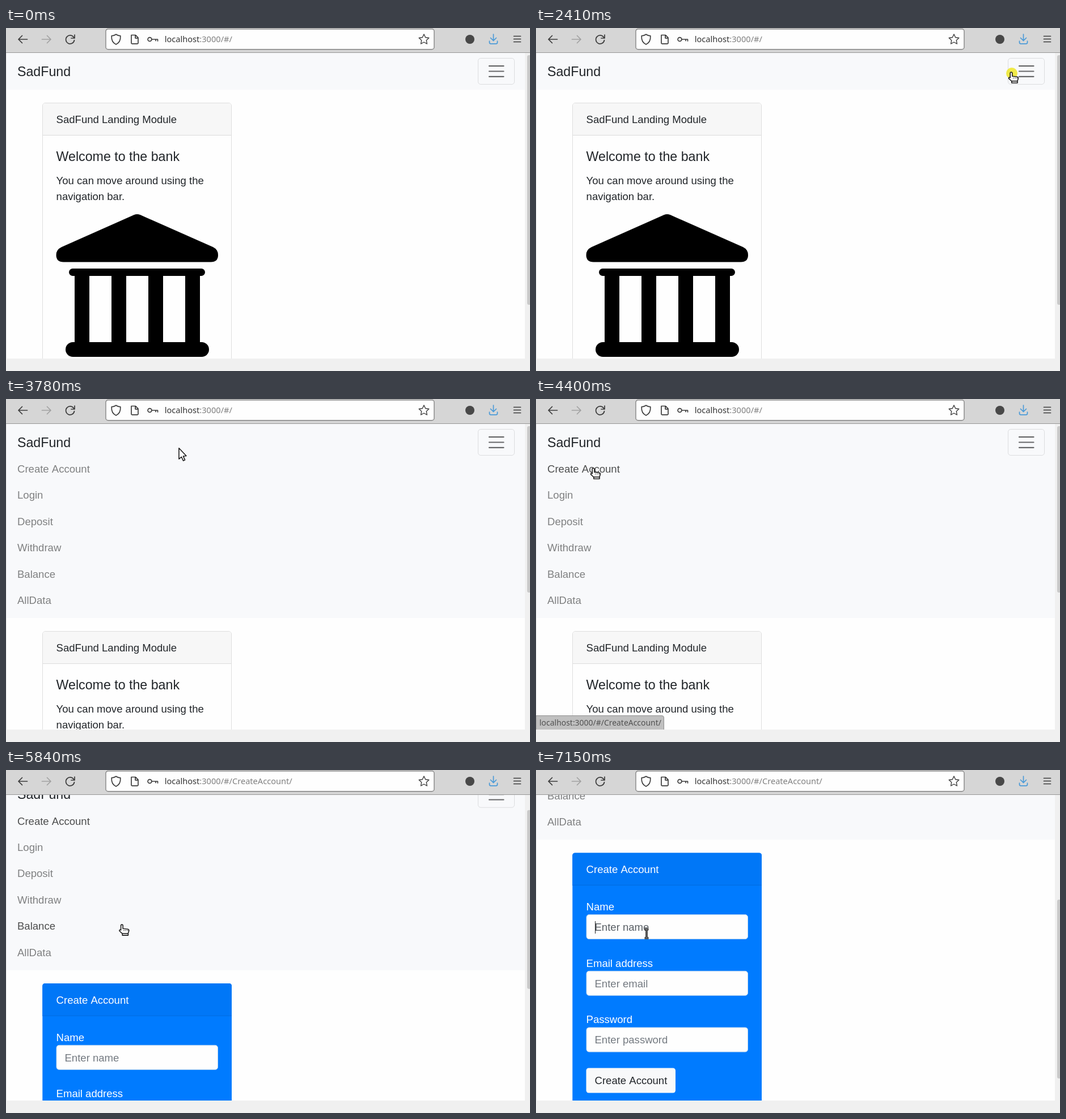
An HTML page for the animation above (8000 ms loop, 924 by 606 pixels).

```html
<!DOCTYPE html>
<html lang="en">
<head>
<meta charset="utf-8">
<title>Bank demo</title>
<style>
html, body { margin: 0; width: 924px; height: 606px; overflow: hidden; background: #fefefe; }
svg { display: block; }
text { font: 18.56px "Liberation Sans", Arial, sans-serif; fill: #212529; white-space: pre; }
.big { font-size: 23.2px; }
.account { word-spacing: 1px; }
.link { fill: #7f8081; }
.link.on { fill: #4c4d4d; }
.white { fill: #fff; }
.hint { fill: #747a81; }
.hint.on { fill: #585e64; }
.url { font: 14.6px "Noto Sans", "Open Sans", sans-serif; fill: #7f7f7f; }
.url .host { fill: #333; }
.tip { font-size: 13.95px; fill: #505050; }
.icon { fill: none; stroke: #3c3c3c; stroke-width: 1.7; stroke-linecap: round; stroke-linejoin: round; }
.cursor { fill: #fff; stroke: #1c1c1c; stroke-width: 1.6; stroke-linejoin: round; }
</style>
</head>
<body>
<svg id="stage" width="924" height="606" viewBox="0 0 924 606">
  <rect width="924" height="606" fill="#fefefe"/>

  <g id="page">
    <rect id="navbar" width="916" height="109" fill="#f8f9fb"/>
    <text class="big" x="20" y="84.6">SadFund</text>
    <rect x="832.5" y="53.5" width="64" height="46" rx="4.6" fill="none" stroke="#dcdddf"/>
    <path d="M852 67.2h25.5M852 76.5h25.5M852 85.8h25.5" stroke="#666768" stroke-width="2.2" stroke-linecap="round"/>
    <svg id="menu" y="99.7" width="916" height="0"></svg>

    <g id="content">
      <g id="landing">
        <rect x="64.5" y="132.5" width="333" height="520" rx="4.6" fill="#fefefe" stroke="#dedede"/>
        <path d="M65 189V137q0-4 4-4h324q4 0 4 4v52z" fill="#f7f7f7"/>
        <path d="M65 189.5h332" stroke="#dcdcdc"/>
        <text x="88.6" y="168">SadFund Landing Module</text>
        <text class="big" x="88.6" y="235.4">Welcome to the bank</text>
        <text x="88.6" y="276">You can move around using the</text>
        <text x="88.6" y="303.8">navigation bar.</text>
        <path d="M225.5 330.2Q231 328 237 330.2L365 387Q374 391.5 374 401Q374 413.5 361 413.5H101.5Q88.5 413.5 88.5 401Q88.5 391.5 98 387Z"/>
        <rect x="111" y="425" width="240" height="13" rx="6.5"/>
        <path d="M134 436v121m65 0v-121m65 0v121m65 0v-121" stroke="#000" stroke-width="26" fill="none"/>
        <rect x="105" y="555" width="253" height="26" rx="13"/>
      </g>
      <g id="form">
        <rect x="64.3" y="132.4" width="333.7" height="480" rx="4.6" fill="#007bff"/>
        <path d="M64.3 189.5V137q0-4.6 4.6-4.6h324.5q4.6 0 4.6 4.6v52.5z" fill="#0077f7"/>
        <path d="M64.3 189.5h333.7" stroke="#006cdf"/>
        <text class="white account" x="88.6" y="168">Create Account</text>
        <g id="fields"></g>
        <rect x="88.5" y="512.5" width="157.5" height="44" rx="4.6" fill="#f8f9fa"/>
        <text class="account" x="103.5" y="541">Create Account</text>
        <path id="caret" d="M104.5 253v22" stroke="#222"/>
      </g>
    </g>
  </g>

  <path d="M.5 44v540" stroke="#e4e4e4"/>
  <rect x="915" y="44" width="9" height="540" fill="#f0f0f0"/>
  <rect id="thumb" x="919" width="8" rx="3" fill="#cacaca"/>

  <g id="status">
    <path d="M0 584V559.5H222q3.5 0 3.5 3.5V584" fill="#c0c0c0" stroke="#8e8e8e"/>
    <text class="url tip" x="6" y="577">localhost:3000/#/CreateAccount/</text>
  </g>

  <rect y="584" width="924" height="22" fill="#f0f0f0"/>
  <rect width="924" height="43" fill="#d6d6d6"/>
  <path d="M0 43.5h924" stroke="#979797"/>
  <rect x="176" y="1.8" width="579" height="36" rx="4" fill="#fefefe" stroke="#858585" stroke-width="1.4"/>
  <text class="url" x="279.7" y="25"><tspan class="host">localhost</tspan>:3000/#/<tspan id="route"></tspan></text>
  <g class="icon">
    <path d="M37.5 20H22M28.5 13.5L22 20l6.5 6.5"/>
    <path d="M63.5 20H79M72.5 13.5L79 20l-6.5 6.5" stroke="#a2a2a2"/>
    <path d="M119.5 16.5A7.5 7.5 0 1 0 120.5 21.5M121 12v6h-6"/>
    <path d="M194 11.2C196.5 13 199 13.7 201.8 13.8C202.3 21 199.5 26.5 194 29C188.5 26.5 185.7 21 186.2 13.8C189 13.7 191.5 13 194 11.2Z"/>
    <path d="M221 12.5h7.5l4.5 4.7v9.3q0 1.3-1.3 1.3h-9.4q-1.3 0-1.3-1.3zM228 12.8v5h4.8"/>
    <path d="M257 20h10.5v3M264 20v2.5"/>
    <circle cx="253.5" cy="20" r="3.4"/>
    <path d="M737 11l2.7 5.7 6.1.8-4.5 4.3 1.1 6.2-5.4-3-5.4 3 1.1-6.2-4.5-4.3 6.1-.8z" stroke-width="1.4"/>
    <circle cx="818" cy="20" r="8" fill="#484848" stroke="none"/>
    <path d="M859.5 11v11.5m-5-5l5 5 5-5M852.5 23v2.5q0 2.3 2.3 2.3h9.4q2.3 0 2.3-2.3v-2.5" stroke="#4a9ad8"/>
    <path d="M895.5 14.5h12M895.5 19.5h12M895.5 24.5h12"/>
  </g>

  <g id="pointer">
    <circle id="glow" cx="1" cy="1" r="10" fill="#efe728" opacity=".85"/>
    <path id="arrow" class="cursor" d="M0-.3V19L4.4 15.2L7.7 22L10.6 20.6L7.6 14L13 13.5Z"/>
    <g id="hand" class="cursor">
      <path d="M-1.8 1Q-1.8-1 0-1T1.8 1V6.2L10.5 7.2Q12.6 7.8 12.4 10L11 14.5V18H.8V15L-4.2 10.4Q-5 8.2-3 8.2L-1.8 8.8Z"/>
      <path d="M3 9.5h8" stroke-width="1.2" stroke-dasharray="1.5 1.7"/>
      <path d="M.8 14.8h10.2"/>
    </g>
    <g id="beam" fill="none">
      <path d="M-3.5-7.5h7M0-7.5V8M-3.5 8h7" stroke="#1c1c1c" stroke-width="3.6"/>
      <path d="M-3.5-7.5h7M0-7.5V8M-3.5 8h7" stroke="#aaa" stroke-width=".9"/>
    </g>
  </g>
</svg>

<script>
const LOOP = 8000, STEP = 70, MENU = 278, ROW = 46.4, TOP = 99.7, SCROLL = 264;
const ARRIVE = 1050, LOADED = 4930, FOCUS = 6890;
const clicks = [[2410, 2610], [4800, LOADED], [6820, 7010]];

// the picture is refreshed every STEP ms, counted from the start of each action
const actions = [0, 450, ARRIVE, 2410, 2540, 3290, 4130, 4800, LOADED, 5420, 6260, 7080];

// pointer glides; power above 1 slows down on that axis, below 1 speeds up
const home = { x: 924, y: 606 };
const glides = [
  { from: 380, to: 520, x: 905, y: 595, px: 1, py: 1 },
  { from: ARRIVE, to: 1750, x: 838, y: 79, px: 1.5, py: 1.5 },
  { from: 3290, to: 4060, x: 101, y: 123, px: 1.27, py: .2 },
  { from: 5420, to: 6120, x: 213, y: 288, px: 2.8, py: 2.7 },
  { from: 6260, to: 7010, x: 219, y: 289, px: 1, py: 1 },
  { from: 7010, to: 7150, x: 195, y: 289, px: 1, py: 1 }
];

const $ = id => document.getElementById(id);
const show = (id, on) => $(id).setAttribute("visibility", on ? "visible" : "hidden");
const set = (id, attrs) => Object.entries(attrs).forEach(([k, v]) => $(id).setAttribute(k, v));
const part = (t, from, to) => Math.min(1, Math.max(0, (t - from) / (to - from)));
const smooth = p => p * p * (3 - 2 * p);
const glide = (p, power) => 1 - (1 - p) ** power;
const within = (v, low, high) => v > low && v < high;

function snap(t) {
  const start = actions.filter(a => a <= t).pop();
  return start + Math.floor((t - start) / STEP) * STEP;
}

function pointerAt(t) {
  return glides.reduce((at, g) => {
    const p = part(t, g.from, g.to);
    return {
      x: at.x + (g.x - at.x) * glide(p, g.px),
      y: at.y + (g.y - at.y) * glide(p, g.py)
    };
  }, home);
}

["Create Account", "Login", "Deposit", "Withdraw", "Balance", "AllData"].forEach((label, i) => {
  $("menu").innerHTML += `<text class="link account" x="20" y="${30.3 + i * ROW}">${label}</text>`;
});
[["Name", "name"], ["Email address", "email"], ["Password", "password"]].forEach(([label, hint], i) => {
  const y = i * 99.7;
  $("fields").innerHTML += `<text class="white" x="88.6" y="${234 + y}">${label}</text>
    <rect x="89" y="${241.6 + y}" width="284.5" height="43" rx="4.6" fill="#fefefe" stroke="#bdd6ef"/>
    <text class="hint" x="103.5" y="${270 + y}">Enter ${hint}</text>`;
});
const links = [...document.querySelectorAll(".link")];
const firstHint = document.querySelector(".hint");

function draw(now) {
  const t = snap(now);
  const open = MENU * smooth(part(t, 2480, 2890));
  const scroll = SCROLL * smooth(part(t, 5760, 6120));
  const { x, y } = pointerAt(t);
  const docY = y + scroll;
  const joined = t >= LOADED, focused = t >= FOCUS;

  set("page", { transform: `translate(0 ${-scroll})` });
  set("navbar", { height: 109 + open });
  set("menu", { height: open });
  set("content", { transform: `translate(0 ${open})` });
  show("landing", !joined);
  show("form", joined);
  show("caret", focused);
  $("route").textContent = joined ? "CreateAccount/" : "";

  const length = joined ? 316 : 441 * 556 / (556 + open);
  set("thumb", { y: 48 + scroll * .6856, height: length });
  set("status", { opacity: part(t, 4200, 4340) - part(t, LOADED, LOADED + 200) });

  const row = open === MENU && within(x, 20, 897) ? Math.floor((docY - TOP) / ROW) : -1;
  links.forEach((link, i) => link.classList.toggle("on", i === row || (joined && i === 0)));
  firstHint.classList.toggle("on", focused);

  const onButton = within(x, 832, 897) && within(docY, 53, 100);
  const onField = joined && within(x, 89, 374) && within(docY, 519, 563);
  const inside = t >= ARRIVE || (t >= 450 && t < 590);
  const hand = onButton || (row >= 0 && row < links.length);
  set("pointer", { transform: `translate(${x} ${y})` });
  show("arrow", inside && !hand && !onField);
  show("hand", inside && hand);
  show("beam", inside && onField);
  show("glow", clicks.some(([from, to]) => t >= from && t < to));
}

const begin = performance.now();
function frame() {
  draw((performance.now() - begin) % LOOP);
  requestAnimationFrame(frame);
}
frame();
</script>
</body>
</html>
```
